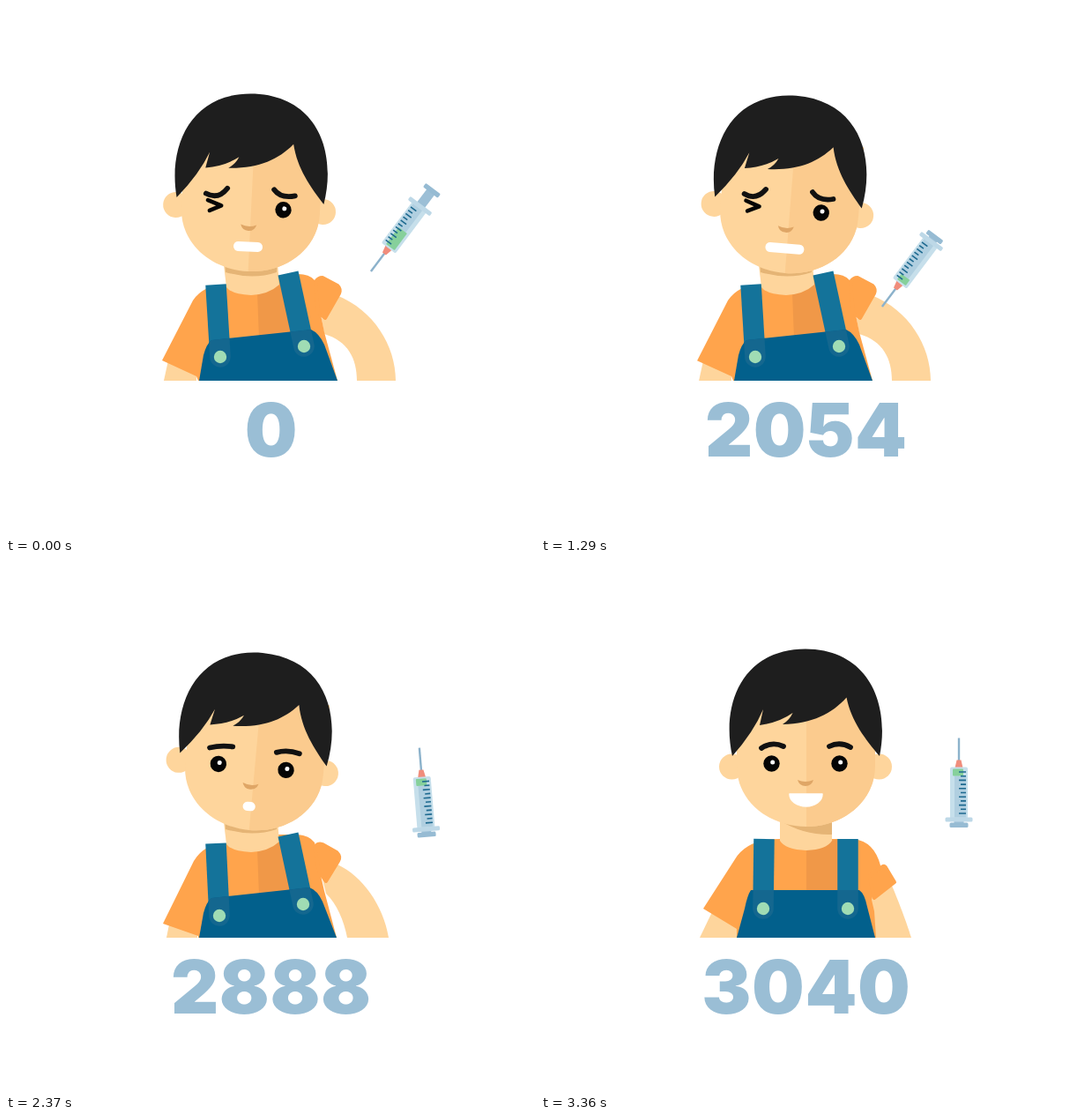
Recreate the animation shown at these times as an HTML page. Size 600 px wide and 600 px high, loop 3930 ms.

```html
<!DOCTYPE html>
<html lang="en">
<head>
<meta charset="utf-8">
<title>Vaccination counter</title>
<style>
html, body { margin: 0; width: 100%; height: 100%; overflow: hidden; background: #fff; }
svg { display: block; width: 100vw; height: 100vh; }
#count { font: 900 84px Inter, "Open Sans", sans-serif; letter-spacing: 0.6px; fill: #9abed5; text-anchor: middle; }
.skin { fill: #fed59c; }
.shirt { fill: #ffa44c; }
.strap { fill: none; stroke: #14739a; stroke-width: 23.5; }
.tab { fill: none; stroke: #14678f; stroke-width: 23.5; stroke-linecap: round; }
.brow { fill: none; stroke: #111; stroke-width: 5.8; stroke-linecap: round; }
</style>
</head>
<body>
<svg viewBox="0 0 600 600">
  <defs>
    <clipPath id="desk"><rect width="600" height="425"/></clipPath>
    <clipPath id="onBib"><use href="#bib"/></clipPath>
  </defs>
  <g clip-path="url(#desk)">
    <path id="armR" class="skin"/>
    <path id="armL" class="skin"/>
    <path id="shirt" class="shirt"/>
    <path id="shade" fill="#f09848"/>
    <path id="cuff" class="shirt" stroke="#ffa44c" stroke-width="4" stroke-linejoin="round"/>
    <path id="neck" class="skin"/>
    <path id="chin" fill="#e5b475"/>
    <path id="strapL" class="strap"/>
    <path id="strapR" class="strap"/>
    <path id="bib" fill="#02608c"/>
    <g clip-path="url(#onBib)">
      <path id="tabL" class="tab"/>
      <path id="tabR" class="tab"/>
    </g>
    <circle id="buttonL" r="7.2" fill="#a0dcb4"/>
    <circle id="buttonR" r="7.2" fill="#a0dcb4"/>
  </g>
  <g id="head">
    <g id="ears">
      <circle class="skin" cx="216.500" cy="231" r="14.500"/>
      <circle class="skin" cx="383.500" cy="231" r="14.500"/>
    </g>
    <g id="face">
      <path class="skin" d="M222 150H379V230C379 270 343 299 301 299C258 299 222 270 222 230Z"/>
      <path fill="#fbcb8e" d="M301 150H379V230C379 270 343 299 301 299Z"/>
    </g>
    <path fill="#1e1e1e" d="M217 219C204 160 228 98 300 97.500C372 98 396 160 384 219C368 200 352 180 346.500 152.500C330 171 308 182 274 183Q282 178 285.500 170Q270 181 248 184Q250 175 252 166Q241 192 217 219Z"/>
    <path fill="#dfa666" d="M291 246Q300 250 309 246Q307 253 300 253Q293 253 291 246Z"/>
    <path id="browL" class="brow"/>
    <path id="browR" class="brow"/>
    <path id="squint" fill="none" stroke="#050505" stroke-width="4.600" stroke-linecap="round" stroke-linejoin="round" d="M252.500 220.500L268 226L255 232"/>
    <g id="eyeL"><circle r="9.200" fill="#050505"/><circle cx="1.200" cy="-1.500" r="2.500" fill="#fff"/></g>
    <g id="eyeR"><circle r="9.200" fill="#050505"/><circle cx="1.200" cy="-1.500" r="2.500" fill="#fff"/></g>
    <rect id="mouth" rx="5.300" fill="#fff"/>
    <path id="smile" fill="#fff" stroke="#fff" stroke-width="1.500" stroke-linejoin="round"/>
  </g>
  <g id="syringe">
    <rect x="-1.200" y="0" width="2.400" height="26" fill="#8cb2cb"/>
    <path fill="#f08d7c" d="M-2.500 25H2.500L4.500 34H-4.500Z"/>
    <rect id="rod" x="-5.500" y="90" width="11" fill="#9cbfd6"/>
    <rect x="-10" y="33" width="20" height="59" rx="2" fill="#c6dfeb"/>
    <rect id="piston" x="-5" width="13" fill="#b0cfe0"/>
    <rect id="liquid" x="-7" y="35" width="12" rx="1" fill="#86d09b"/>
    <path id="ticks" stroke="#1e6a90" stroke-width="1.600"/>
    <rect x="-15.500" y="90" width="31" height="5" rx="1.500" fill="#bdd8e7"/>
    <rect id="thumb" x="-10.500" width="21" height="5.500" rx="1.500" fill="#96bbd3"/>
  </g>
  <text id="count" x="300.8" y="510.5">0</text>
</svg>
<script>
const LOOP = 3930, START = 120, END = 3360, STEP = 30;
const $ = id => document.getElementById(id);
const set = (id, attrs) => { for (const k in attrs) $(id).setAttribute(k, attrs[k]); };
const nums = s => s.split(' ').map(Number);
const smooth = u => u * u * (3 - 2 * u);

// Blend two strings of the same form number by number.
function mix(a, b, u) {
  if (a === b) return a;
  const to = b.match(/-?\d+(\.\d+)?/g);
  let i = 0;
  return a.replace(/-?\d+(\.\d+)?/g, n => +(+n + (to[i++] - n) * u).toFixed(2));
}

// Value of a [time, string] track at time t.
function at(keys, t) {
  const i = keys.findIndex(k => k[0] > t);
  if (i < 0) return keys[keys.length - 1][1];
  if (i === 0) return keys[0][1];
  const [t0, a] = keys[i - 1], [t1, b] = keys[i];
  return mix(a, b, smooth((t - t0) / (t1 - t0)));
}

const hurt = {
  armR: 'M375 328 C417 345 442 385 442 425 L398 425 C398 400 388 380 361 372 L358 355 Z',
  armL: 'M184 402 L179 425 L216 425 L216 415 Z',
  shirt: 'M250 316 Q224 316 212 334 L177 402 L216 420 L218 425 L376 425 L361 370 L356 345 L350 311 Q344 304 331 304 L308 306 Z',
  shade: 'M285 325 L314 312 L326 370 L287 377 Z',
  cuff: 'M351 313 Q354 308 359 308 L376 317 Q380 321 378 326 L362 354 L354 348 Z',
  neck: 'M247 294 L308 292 L310 316 Q298 327 278 328 Q256 327 250 319 Z',
  chin: 'M248 290 L308 290 L307 302 Q280 311 249 302 Z',
  bib: 'M233 379 L346 367 Q355 371 361 384 L376 425 L219 425 L224 396 Q227 384 233 379 Z',
  left: '238 316 243 398',
  right: '320 303 338 386'
};
const relieved = {
  ...hurt,
  armL: 'M186 405 L182 425 L217 425 L217 416 Z',
  shirt: 'M250 317 Q224 317 212 336 L179 407 L217 423 L218 425 L376 425 L361 370 L356 345 L350 311 Q344 304 331 304 L308 306 Z',
  left: '239 317 243 398'
};
const lowered = {
  ...relieved,
  armR: 'M376 342 C404 355 428 388 434 425 L387 425 C383 405 375 386 363 375 L358 355 Z',
  shirt: 'M250 318 Q225 318 213 338 L178 409 L218 423 L218 425 L375 425 L361 372 L356 350 L350 317 Q344 309 331 308 L308 308 Z',
  cuff: 'M350 322 Q354 317 359 319 L375 328 Q380 333 377 338 L363 361 L355 350 Z',
  bib: 'M233 380 L344 368 Q353 371 359 384 L375 425 L219 425 L224 397 Q227 385 233 380 Z',
  left: '238 318 242 400',
  right: '320 308 337 387'
};
const swung = {
  armR: 'M390 362 C398 372 414 395 424 425 L376 425 C374 410 372 390 368 372 L366 360 Z',
  armL: 'M194 398 L187 425 L222 425 L224 410 Z',
  shirt: 'M270 313 Q236 313 224 336 L189 398 L226 413 L222 425 L380 425 L378 395 L374 372 L383 333 Q370 313 355 311 L330 313 Z',
  shade: 'M301 322 L335 311 L341 371 L301 371 Z',
  cuff: 'M369 348 Q368 344 372 342 L384 333 Q389 331 391 336 L398 351 L376 370 Z',
  neck: 'M270 296 L330 297 L330 313 Q322 325 300 326 Q278 325 270 314 Z',
  chin: 'M270 290 L330 290 L330 307 Q298 307 270 296 Z',
  bib: 'M238 371 L361 371 Q367 375 370 390 L379 425 L222 425 L231 392 Q234 377 238 371 Z',
  left: '258 311 252 392',
  right: '343 309 348 392'
};
const happy = {
  ...swung,
  armR: 'M398 366 C402 375 414 405 420 425 L376 425 C374 410 372 390 370 376 L368 366 Z',
  armL: 'M194 396 L180 425 L222 425 L222 412 Z',
  shirt: 'M271 313 Q234 313 220 336 L184 392 L222 415 L222 425 L380 425 L378 395 L375 382 L385 343 Q378 316 355 313 L330 313 Z',
  shade: 'M301 322 L337 313 L337 371 L301 371 Z',
  cuff: 'M373 357 Q372 354 376 352 L386 345 Q390 342 392 347 L401 362 L378 380 Z',
  neck: 'M271 290 L330 290 L330 315 Q324 325 301 326 Q277 325 271 315 Z',
  chin: 'M271 288 L330 288 L330 308 Q298 309 271 292 Z',
  left: '253 313 252 392',
  right: '348 313 348 392'
};
const poses = [[0, hurt], [1200, hurt], [1950, relieved], [2370, lowered], [2730, swung], [3330, happy]];
const body = {};
for (const part in hurt) body[part] = poses.map(([t, p]) => [t, p[part]]);

const browKeys = (worry, flat, raised, low, calm) => [[0, worry], [1760, worry], [1950, flat], [2370, raised],
  [2610, raised], [2730, low], [2790, low], [2940, calm]];
const browL = browKeys('M250 213 Q264 220 274 206', 'M249 214 Q262 211 274 212',
  'M250 210 Q262 206 276 206.5', 'M250 215 Q263 210 277 215', 'M250 210 Q262 202 275 208');
const browR = browKeys('M327 205 Q335 215 351 211', 'M325 210 Q338 210 350 212',
  'M326 208.5 Q338 204 352 207.5', 'M326 214 Q340 209 353 214', 'M327 208 Q339 202 351 209');

// x, y between the hair tips, and tilt
const head = [[0, '277 221 2.75'], [720, '277 221 2.75'], [1290, '280.5 223 4.5'], [1950, '282.5 221.5 5.2'],
  [2370, '280.5 223 5.2'], [2730, '310.5 222 9.9'], [3060, '305 216 3'], [3330, '300.5 219 0']];
// sideways shift of the face, rise of the ears
const turn = [[0, '1 -3.5'], [720, '1 -3.5'], [1290, '2 -4'], [2370, '2 -4'], [2730, '4 -12.5'], [3330, '0 0']];
const lids = [[0, '1'], [1800, '1'], [1860, '0.1'], [1950, '0.5'], [2040, '1'],
  [2640, '1'], [2730, '0.5'], [2790, '0.1'], [2910, '1']];
// width, height, middle
const mouth = [[0, '33 11 271'], [600, '44 11 271'], [1780, '44 11 271'], [1930, '15 11 273'],
  [2580, '14 10 272'], [2700, '10 6 276']];
const smile = [[2700, 'M296 275 L306 275 C306 278 304 280 301 280 C298 280 296 278 296 275 Z'],
  [2730, 'M296 275 L306 275 C306 278 304 280 301 280 C298 280 296 278 296 275 Z'],
  [3030, 'M282 262 L319 262 C319 270 311 276 301 276 C290 276 282 270 282 262 Z']];

// middle of the barrel, and angle
const syringe = [[0, '444 261 -143'], [90, '444 261 -143'], [660, '417 301 -143'], [1830, '417 301 -143'],
  [1950, '420 295 -143'], [2370, '473 259.5 -4.8'], [2730, '474 249.5 0'], [3330, '474 248.5 0']];
const plunger = [[0, '17'], [720, '17'], [1170, '1']];

// time, value, rate per ms
const tally = [[90, 0, 0.6], [720, 940, 2.1], [1290, 2054, 1.45], [1950, 2683, 0.64],
  [2370, 2888, 0.37], [2730, 2987, 0.19], [3330, 3040, 0]];
function countAt(t) {
  if (t <= 90) return 0;
  const i = tally.findIndex(k => k[0] > t);
  if (i < 0) return 3040;
  const [t0, a, ra] = tally[i - 1], [t1, b, rb] = tally[i];
  const d = t1 - t0, u = (t - t0) / d;
  return Math.round(a + (b - a) * smooth(u) + d * u * (1 - u) * (ra * (1 - u) - rb * u));
}

function drawStrap(side, line) {
  const [x, y, bx, by] = nums(line);
  const d = `M${x} ${y}L${bx} ${by}`;
  set('strap' + side, { d });
  set('tab' + side, { d });
  set('button' + side, { cx: bx, cy: by });
}

function draw(t) {
  for (const id of ['armR', 'armL', 'shirt', 'shade', 'cuff', 'neck', 'chin', 'bib']) set(id, { d: at(body[id], t) });
  drawStrap('L', at(body.left, t));
  drawStrap('R', at(body.right, t));

  const [hx, hy, tilt] = nums(at(head, t)), [shift, rise] = nums(at(turn, t));
  set('head', { transform: `translate(${hx} ${hy}) rotate(${tilt}) translate(-300.5 -219)` });
  set('face', { transform: `translate(${shift} 0)` });
  set('ears', { transform: `translate(0 ${rise})` });
  set('browL', { d: at(browL, t) });
  set('browR', { d: at(browR, t) });

  const open = +at(lids, t), squint = t < 1860, y = 227.5 + 2.5 * (1 - open);
  set('squint', { visibility: squint ? 'visible' : 'hidden' });
  set('eyeL', { transform: `translate(261.5 ${y}) scale(1 ${open})`, visibility: squint ? 'hidden' : 'visible' });
  set('eyeR', { transform: `translate(338.5 ${y}) scale(1 ${open})` });

  const [w, h, my] = nums(at(mouth, t)), smiling = t >= 2700;
  set('mouth', { x: 300.5 - w / 2, y: my - h / 2, width: w, height: h, visibility: smiling ? 'hidden' : 'visible' });
  set('smile', { d: at(smile, t), visibility: smiling ? 'visible' : 'hidden' });

  const [sx, sy, angle] = nums(at(syringe, t)), out = +at(plunger, t);
  set('syringe', { transform: `translate(${sx} ${sy}) rotate(${angle}) translate(0 -50)` });
  set('rod', { height: 6 + out });
  set('thumb', { y: 95 + out });
  set('liquid', { height: 7 + out });
  set('piston', { y: 42 + out, height: 48 - out });

  $('count').textContent = countAt(t);
}

let marks = '';
for (let i = 0; i < 11; i++) marks += `M${i % 2 ? 2 : 0} ${38.5 + i * 4.7}H8`;
set('ticks', { d: marks });

const begin = performance.now();
function tick() {
  const t = (performance.now() - begin) % LOOP;
  draw(t < START ? 0 : Math.min(END, Math.floor(t / STEP) * STEP));
  requestAnimationFrame(tick);
}
tick();
</script>
</body>
</html>
```
